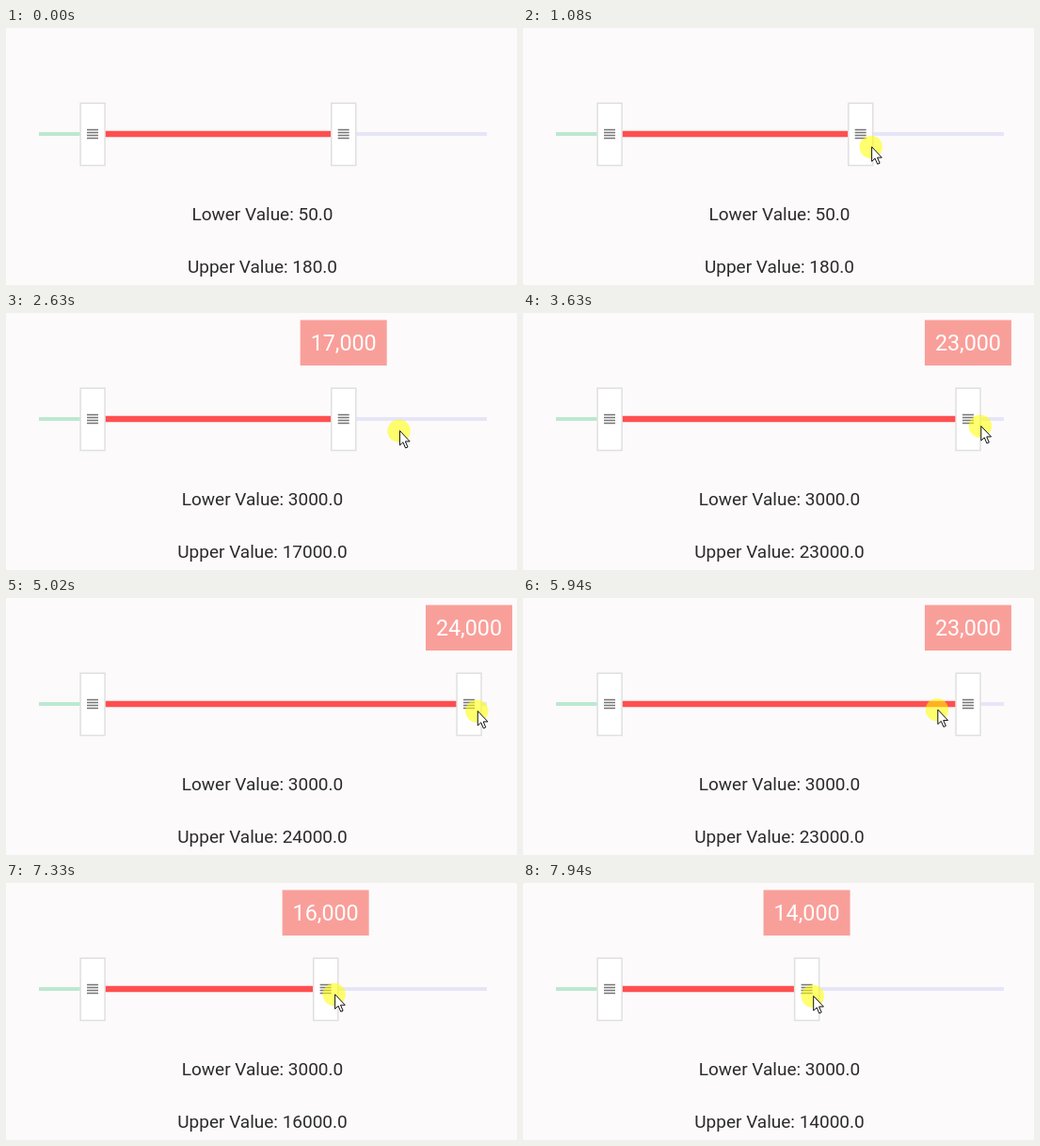
These frames come from a looping animation (543 by 274 pixels, 8 s). An HTML page:

```html
<!DOCTYPE html>
<html lang="en">
<head>
<meta charset="utf-8">
<title>Range slider</title>
<style>
  html, body { margin: 0; width: 100%; height: 100%; overflow: hidden; background: #fcfafb; }
  svg { display: block; width: 100%; height: 100%; }
  text { font-family: Roboto, sans-serif; text-anchor: middle; }
  .label { font-size: 19px; fill: #2b2b2b; }
  .tip { font-size: 23.3px; fill: #fff; }
</style>
</head>
<body>
<svg viewBox="0 0 543 274">
  <defs>
    <g id="thumb">
      <rect x="-12.9" y="80.2" width="26" height="66.3" fill="#fff" stroke="#e0e0e1" stroke-width="1.5"/>
      <path d="M-6 108.6H6M-6 111.6H6M-6 114.5H6M-6 117.4H6" stroke="#757575" stroke-width="1.5"/>
    </g>
  </defs>
  <rect width="543" height="274" fill="#fcfafb"/>
  <path d="M35 113H92" stroke="#bce8d0" stroke-width="4"/>
  <path d="M92 113H511" stroke="#e7e6f8" stroke-width="4"/>
  <path id="active" stroke="#ff4f50" stroke-width="6.6"/>
  <use href="#thumb" x="92"/>
  <use id="upper" href="#thumb"/>
  <g id="tooltip">
    <rect x="-46" y="7.5" width="92" height="48.5" fill="#f99f9a"/>
    <text id="tipText" class="tip" y="40.3"></text>
  </g>
  <text id="lowerLabel" class="label" x="272.5" y="205.2"></text>
  <text id="upperLabel" class="label" x="272.5" y="260.7"></text>
  <g id="cursor">
    <circle cx="-.4" cy=".6" r="12.2" fill="#ff0" opacity=".56"/>
    <path d="M.5 .5V16L4 12.8L6.6 18.9L9 17.9L6.4 11.9H11.2Z" fill="#fff" stroke="#111"/>
  </g>
</svg>
<script>
const LOOP = 8000, START = 150, STEP = 77.1;
const LEFT = 35, UNIT = 19.04, MAX = 25;
const $ = id => document.getElementById(id);

// Pointer stops: time, x, y
const stops = [
  [150, 438, 268], [530, 384, 153], [1080, 370, 126], [1540, 370, 126],
  [2000, 381, 126], [2170, 381, 126], [2630, 419, 125], [3630, 487, 120],
  [4470, 514, 120], [4790, 514, 120], [5020, 500, 120], [6870, 379, 117],
  [7940, 308, 120]
];
// Spans in which the pointer holds the upper thumb
const drags = [[1080, 1540], [3430, 5400], [7210, LOOP]];

function pointer(t) {
  const i = Math.max(1, stops.findIndex(s => s[0] >= t));
  const [t0, x0, y0] = stops[i - 1], [t1, x1, y1] = stops[i];
  const k = (t - t0) / (t1 - t0);
  return [x0 + (x1 - x0) * k, y0 + (y1 - y0) * k];
}

// The thumb snaps to whole thousands and stays where it was released
function upperValue(drag, t) {
  const [x] = pointer(Math.min(t, drag[1]));
  return Math.min(MAX, Math.floor((x - LEFT) / UNIT));
}

const show = (el, on) => el.setAttribute('visibility', on ? 'visible' : 'hidden');
const move = (el, x, y) => el.setAttribute('transform', `translate(${x} ${y})`);

function render(time) {
  // The picture advances in even steps
  const steps = Math.floor((time - START) / STEP);
  const t = Math.min(START + steps * STEP, stops.at(-1)[0]);
  const drag = drags.findLast(d => d[0] <= t);
  const value = drag ? upperValue(drag, t) : 17;
  const x = LEFT + value * UNIT;

  $('active').setAttribute('d', `M92 113H${x}`);
  move($('upper'), x, 0);
  move($('tooltip'), x, 0);
  show($('tooltip'), drag);
  $('tipText').textContent = value + ',000';
  $('lowerLabel').textContent = 'Lower Value: ' + (drag ? '3000.0' : '50.0');
  $('upperLabel').textContent = 'Upper Value: ' + (drag ? value + '000.0' : '180.0');

  show($('cursor'), t >= START);
  move($('cursor'), ...pointer(t));
}

const origin = performance.now();
function tick() {
  render((performance.now() - origin) % LOOP);
  requestAnimationFrame(tick);
}
tick();
</script>
</body>
</html>
```
